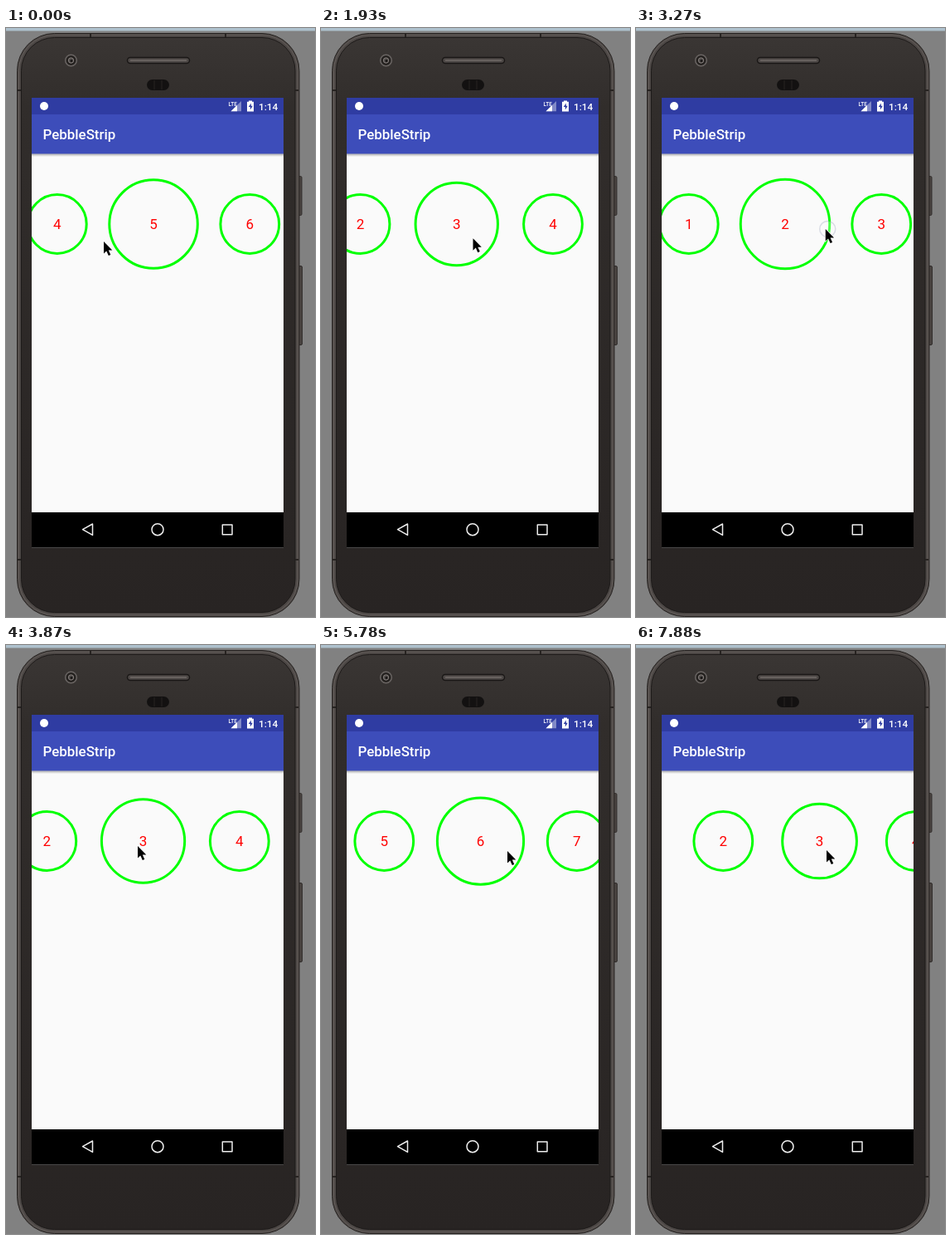
An HTML page for the animation above (8000 ms loop, 373 by 709 pixels).

```html
<!DOCTYPE html>
<html lang="en">
<head>
<meta charset="utf-8">
<title>Number carousel</title>
<style>
  html, body { margin: 0; width: 100%; height: 100%; overflow: hidden; background: #818181; }
  svg { display: block; width: 373px; height: 709px; font-family: Roboto, sans-serif; }
  #items circle { fill: none; stroke: #0f0; stroke-width: 3; }
  #items text { fill: #f00; font-size: 17px; text-anchor: middle; }
</style>
</head>
<body>
<svg viewBox="0 0 373 709">
  <defs>
    <linearGradient id="face" x2="0" y2="1">
      <stop offset="0" stop-color="#3a3634"/>
      <stop offset=".12" stop-color="#312d2b"/>
      <stop offset="1" stop-color="#282423"/>
    </linearGradient>
    <linearGradient id="barShadow" x2="0" y2="1">
      <stop offset="0" stop-opacity=".3"/>
      <stop offset="1" stop-opacity="0"/>
    </linearGradient>
    <clipPath id="screen"><rect x="31" y="84" width="304" height="541.5"/></clipPath>
  </defs>

  <!-- Desktop and phone body -->
  <rect width="373" height="709" fill="#818181"/>
  <rect width="373" height="3.5" fill="#aec1cd"/>
  <rect x="352" y="178.5" width="5" height="47" rx="1.5" fill="#4b4542" stroke="#302c2a"/>
  <rect x="352" y="286.5" width="5.5" height="95" rx="1.5" fill="#4b4542" stroke="#302c2a"/>
  <rect x="13.5" y="6.5" width="340.5" height="702" rx="45" fill="#4c4745" stroke="#292523"/>
  <rect x="15.5" y="8.5" width="336.5" height="698" rx="43" fill="none" stroke="#625c59"/>
  <rect x="18.5" y="11.5" width="330.5" height="692" rx="40" fill="url(#face)" stroke="#1d1a19"/>
  <path d="M14 75h4M14 640h4M349 75h4M349 640h4M102 7v4M265 7v4" stroke="#272321" stroke-width="2"/>
  <circle cx="78.5" cy="39" r="6.8" fill="#24211f" stroke="#6a6563" stroke-width="1.5"/>
  <circle cx="78.5" cy="39" r="3.2" fill="#514d4b" stroke="#817b78"/>
  <circle cx="79" cy="39.5" r="1.5" fill="#171514"/>
  <rect x="146.5" y="35.5" width="75" height="7" rx="3.5" fill="#4d4846" stroke="#1a1716" stroke-width="1.5"/>
  <path d="M150 39h68" stroke="#67615e" stroke-width="2"/>
  <rect x="170" y="62" width="27" height="13" rx="6.5" fill="#131111"/>
  <path d="M179 63v11M188 63v11" stroke="#282422"/>

  <g clip-path="url(#screen)">
    <rect x="31" y="84" width="304" height="542" fill="#fafafa"/>
    <g id="items"></g>
    <rect x="31" y="84" width="304" height="20" fill="#2f3ca2"/>
    <rect x="31" y="104" width="304" height="47.5" fill="#3d4dba"/>
    <rect x="31" y="151.5" width="304" height="3.5" fill="url(#barShadow)"/>
    <text x="44.5" y="134.3" font-size="16.9" font-weight="500" fill="#fff">PebbleStrip</text>

    <!-- Status icons -->
    <g fill="#fff">
      <circle cx="46" cy="94" r="5"/>
      <text x="268.5" y="93.5" font-size="6.5" font-weight="500">LTE</text>
      <path d="M284 88v12.3h-12.5z" opacity=".4"/>
      <path d="M279 93v7.3h-7.5z"/>
      <path d="M293 88.8v-1.3h4v1.3h2v11.7h-8v-11.7z"/>
      <path d="M295.8 90.5l-3 4.5h2v3.5l3-4.7h-2z" fill="#2f3ca2"/>
      <text x="305" y="98.5" font-size="11.8" font-weight="500">1:14</text>
    </g>

    <!-- Navigation bar -->
    <rect x="31" y="583" width="304" height="43"/>
    <g fill="none" stroke="#eee" stroke-width="1.5" stroke-linejoin="round">
      <path d="M92.5 603.7l12-6.7v13.4z"/>
      <circle cx="183" cy="603.7" r="7"/>
      <rect x="261.3" y="598" width="11.7" height="11.7"/>
    </g>
  </g>

  <circle id="touch" r="9.5" fill="#fff" fill-opacity=".3" stroke="#8c96b4" stroke-opacity=".3" stroke-width="1.5"/>
  <path id="cursor" d="M0 0v14.5l3.3-3.1 2.5 5.6 2.5-1.1-2.5-5.4h4.5z" stroke="#fff" stroke-width="1.2" paint-order="stroke"/>
</svg>

<script>
const DURATION = 8000, STEP = 148.5, LAST_STEP = 53;
const SPACING = 116.25, CENTER = 183, ROW = 236, COUNT = 7;

// Tracks map a step to a value, with straight lines between the points.
const scrollTrack = {
  4: -403.2, 5: -395, 8: -294, 9: -255, 10: -205, 11: -185, 14: -185,
  17: -79.5, 18: -50, 20: -30, 21: -30, 25: -120, 26: -183.2, 28: -300,
  29: -315, 32: -450, 33: -627.2, 34: -630.7, 35: -630.7, 38: -505, 41: 40,
  43: 40, 45: -111, 46: -230, 47: -285, 50: -285, 53: -127.2
};
const pointerTrack = {
  0: 118, 3: 82, 4: 82, 9: 226, 11: 235, 12: 235, 14: 132, 17: 237,
  20: 250, 21: 250, 25: 165, 26: 159, 29: 230, 32: 115, 33: 109, 35: 109,
  38: 225, 41: 230, 43: 230, 45: 78, 47: 80, 50: 80, 53: 230
};
const heightTrack = { 4: 257, 8: 256, 12: 256, 17: 242, 30: 242, 33: 248, 43: 248, 45: 247 };

// First step of each drag and how many steps it stays pressed
const drags = { 5: 4, 15: 2, 22: 4, 30: 2, 36: 2, 44: 2, 51: 2 };

function valueAt(track, step) {
  const points = Object.entries(track).map(([at, value]) => [+at, value]);
  const next = points.findIndex(([at]) => at >= step);
  if (next < 0) return points.at(-1)[1];
  if (next === 0) return points[0][1];
  const [[start, from], [end, to]] = points.slice(next - 1, next + 1);
  return from + (to - from) * (step - start) / (end - start);
}

const byId = id => document.getElementById(id);
const place = (node, x, y) => node.setAttribute("transform", `translate(${x} ${y})`);
const make = (tag, parent) =>
  parent.appendChild(document.createElementNS("http://www.w3.org/2000/svg", tag));

const items = Array.from({ length: COUNT }, (_, i) => {
  const group = make("g", byId("items"));
  const circle = make("circle", group);
  const label = make("text", group);
  label.setAttribute("y", 6);
  label.textContent = i + 1;
  return { group, circle };
});

function draw() {
  const time = performance.now() % DURATION;
  const step = Math.min(LAST_STEP, Math.floor((time + 10) / STEP));
  const scroll = valueAt(scrollTrack, step);

  items.forEach(({ group, circle }, i) => {
    const itemX = scroll + SPACING * (i + 1);
    place(group, itemX, ROW);
    circle.setAttribute("r", Math.max(35.4, 54.5 - Math.abs(itemX - CENTER) / 4));
  });

  const x = valueAt(pointerTrack, step);
  const y = valueAt(heightTrack, step);
  const lag = 2.5 * Math.sign(x - valueAt(pointerTrack, step - 1));
  const pressed = Object.entries(drags).some(([start, length]) => step >= +start && step < +start + length);
  place(byId("cursor"), x, y);
  place(byId("touch"), x - lag, y);
  byId("touch").style.display = pressed ? "" : "none";
  requestAnimationFrame(draw);
}
draw();
</script>
</body>
</html>
```
